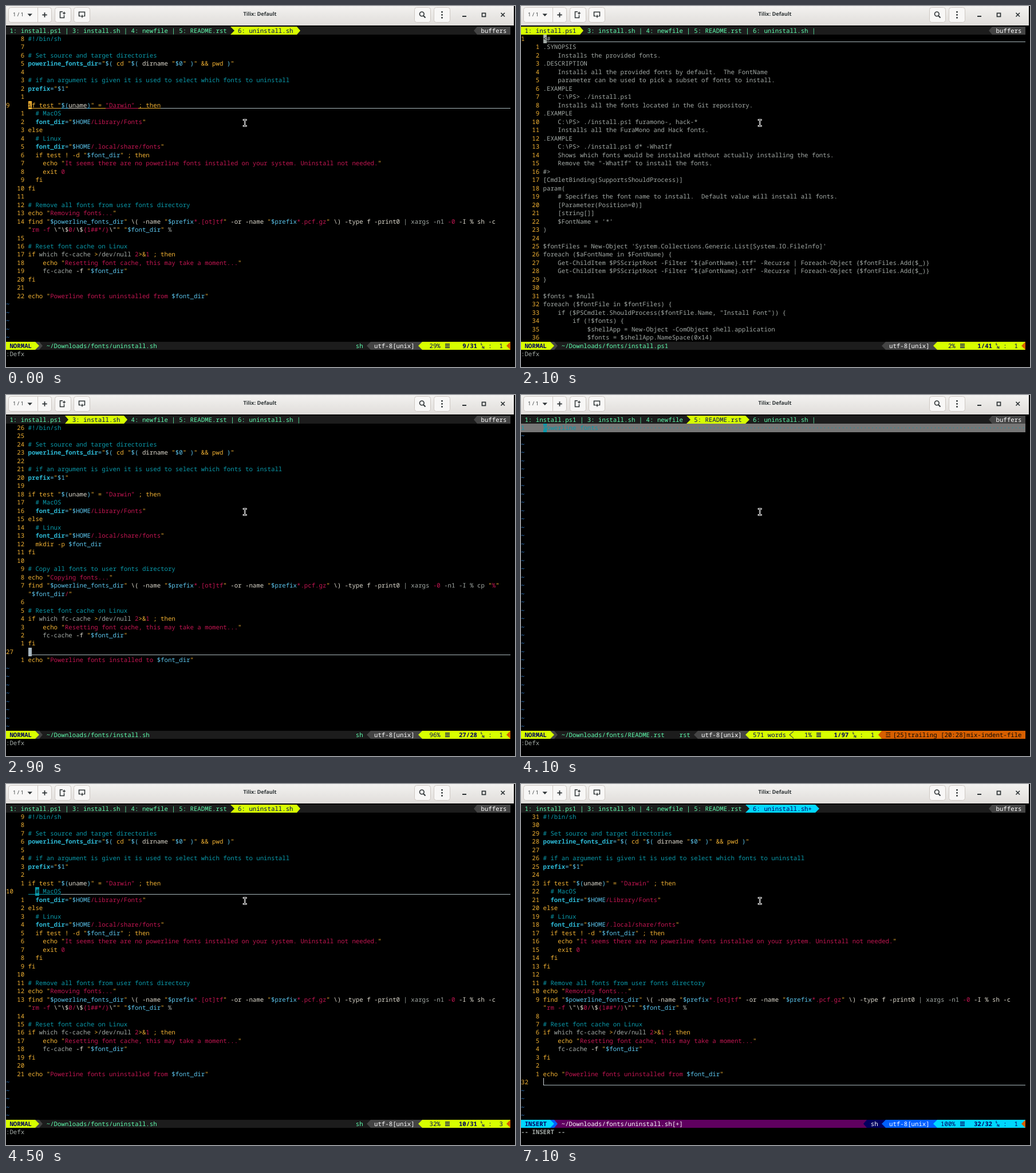
An HTML page with a canvas for the animation above (8000 ms loop, 889 px wide and 630 px high).

```html
<!DOCTYPE html>
<html lang="en">
<head>
<meta charset="utf-8">
<title>Terminal</title>
<style>
  html, body { margin: 0; width: 100%; height: 100%; overflow: hidden; background: #000; }
  canvas { display: block; }
</style>
</head>
<body>
<canvas id="stage" width="889" height="630"></canvas>
<script>
const ctx = document.getElementById('stage').getContext('2d');
const CW = 6.43, RH = 14.48, TOP = 35.6, COLS = 137, LOOP = 8000;
const MONO = '10.72px "Noto Sans Mono", "DejaVu Sans", monospace';
const SANS = '"Open Sans", sans-serif';

// Colour keys, used in text as ^key
const INK = {
  g: '#a3aaa6', c: '#0a9aab', y: '#f2b233', s: '#c41652',
  v: '#5cc6ee', b: '#2cb6d2', w: '#dcd8cc', t: '#2f7fd0'
};
const NORMAL = { name: 'NORMAL', a: '#d7ff00', b: '#444', c: '#1c1c1c', ink: '#5fffaf', ft: '#1c1c1c' };
const INSERT = { name: 'INSERT', a: '#00d7ff', b: '#005fff', c: '#5f005f', ink: '#fff', ft: '#00005f' };
const NAVY = '#00005f', ORANGE = '#d75f00';

// A leading + marks a wrapped row
const head = un => String.raw`^c#!/bin/sh

^c# Set source and target directories
^bpowerline_fonts_dir^v=^y"^v$( ^ycd "^v$( ^wdirname ^y"^v$0^y" ^v)^y" && pwd ^v)^y"

^c# if an argument is given it is used to select which fonts to ${un}install
^bprefix^v=^y"^v$1^y"

^yif test "^v$(^wuname^v)^y" = ^s"Darwin" ^y; then
^c  # MacOS
  ^bfont_dir^v=^y"^v$HOME^s/Library/Fonts^y"
^yelse
^c  # Linux
  ^bfont_dir^v=^y"^v$HOME^s/.local/share/fonts^y"
`;
const find = String.raw`^yfind "^v$powerline_fonts_dir^y" ^w\( -name ^y"^v$prefix^s*.[ot]tf^y" ^w-or -name ^y"^v$prefix^s*.pcf.gz^y" ^w\) -type f -print0 ^g| xargs `;
const tail = done => String.raw`
^c# Reset font cache on Linux
^yif ^gwhich fc-cache ^y>^g/dev/null ^s2^y>&^s1 ^y; then
^y    echo "^sResetting font cache, this may take a moment...^y"
    fc-cache ^w-f ^y"^v$font_dir^y"
^yfi

^yecho "^sPowerline fonts ${done} ^v$font_dir^y"`;

const uninstall = head('un') + String.raw`^y  if test ! -d "^v$font_dir^y" ; then
^y    echo "^sIt seems there are no powerline fonts installed on your system. Uninstall not needed.^y"
^y    exit ^s0
^y  fi
^yfi

^c# Remove all fonts from user fonts directory
^yecho "^sRemoving fonts...^y"
${find}-n1 ^s-0 ^w-I % sh -c
+^y"^srm -f ^w\"\$^s0/^w\$^s{1##*/}^w\"^y" "^v$font_dir^y" ^g%
` + tail('uninstalled from');

const install = head('') + String.raw`^y  mkdir -p ^v$font_dir
^yfi

^c# Copy all fonts to user fonts directory
^yecho "^sCopying fonts...^y"
${find}^s-0 ^g-n1 -I % cp ^y"^s%^y"
+^y"^v$font_dir^s/^y"
` + tail('installed to');

const powershell = `<#
.SYNOPSIS
    Installs the provided fonts.
.DESCRIPTION
    Installs all the provided fonts by default.  The FontName
    parameter can be used to pick a subset of fonts to install.
.EXAMPLE
    C:\\PS> ./install.ps1
    Installs all the fonts located in the Git repository.
.EXAMPLE
    C:\\PS> ./install.ps1 furamono-, hack-*
    Installs all the FuraMono and Hack fonts.
.EXAMPLE
    C:\\PS> ./install.ps1 d* -WhatIf
    Shows which fonts would be installed without actually installing the fonts.
    Remove the "-WhatIf" to install the fonts.
#>
[CmdletBinding(SupportsShouldProcess)]
param(
    # Specifies the font name to install.  Default value will install all fonts.
    [Parameter(Position=0)]
    [string[]]
    $FontName = '*'
)

$fontFiles = New-Object 'System.Collections.Generic.List[System.IO.FileInfo]'
foreach ($aFontName in $FontName) {
    Get-ChildItem $PSScriptRoot -Filter "\${aFontName}.ttf" -Recurse | Foreach-Object {$fontFiles.Add($_)}
    Get-ChildItem $PSScriptRoot -Filter "\${aFontName}.otf" -Recurse | Foreach-Object {$fontFiles.Add($_)}
}

$fonts = $null
foreach ($fontFile in $fontFiles) {
    if ($PSCmdlet.ShouldProcess($fontFile.Name, "Install Font")) {
        if (!$fonts) {
            $shellApp = New-Object -ComObject shell.application
            $fonts = $shellApp.NameSpace(0x14)`;

const readme = '^cPowerline fonts' + '·'.repeat(116);

const TABS = ['1: install.ps1', '3: install.sh', '4: newfile', '5: README.rst', '6: uninstall.sh'];
const script = { tab: 4, text: uninstall, total: 31, ft: 'sh', col: 1 };
const SCENES = [
  { ...script, at: 0, line: 9 },
  { ...script, at: 400, line: 10, col: 3 },
  { at: 2100, tab: 0, text: powershell, total: 41, line: 1, col: 1 },
  { at: 2900, tab: 1, text: install, total: 28, line: 27, col: 1, ft: 'sh' },
  { at: 3500, tab: 2, text: '', total: 1, line: 1, col: 1 },
  { at: 4100, tab: 3, text: readme, total: 97, line: 1, col: 1, ft: 'rst', fold: true,
    words: ' 571 words ', warn: ' ☲ [25]trailing [20:28]mix-indent-file ' },
  { ...script, at: 4500, line: 10, col: 3 },
  { ...script, at: 6300, line: 31 },
  { ...script, at: 7100, text: uninstall + '\n', total: 32, line: 32, insert: true }
];

const px = col => Math.round(col * CW);
const py = row => Math.round(TOP + row * RH);

function rect(x, y, w, h, color) {
  ctx.fillStyle = color;
  ctx.fillRect(x, y, w, h);
}

function box(col, row, n, color) {
  rect(px(col), py(row), px(col + n) - px(col), py(row + 1) - py(row), color);
}

function underline(col, row, n, color) {
  rect(px(col), Math.round(TOP + row * RH + 11.7), px(col + n) - px(col), 1, color);
}

function path(points, width) {
  ctx.beginPath();
  points.forEach(([x, y]) => ctx.lineTo(x, y));
  if (width) {
    ctx.lineWidth = width;
    ctx.stroke();
  } else ctx.fill();
}

// Writes one character per cell and returns the cells
function put(col, row, text, color = 'g', bold = false) {
  const cells = [];
  for (const [, key, ch] of text.matchAll(/\^(\w)|(.)/gu)) {
    if (key) { color = key; continue; }
    const ink = INK[color] || color;
    ctx.font = (bold || color === 'b' ? 'bold ' : '') + MONO;
    ctx.fillStyle = ink;
    ctx.fillText(ch, (col + cells.length) * CW, TOP + row * RH + 10.9);
    cells.push({ ch, ink });
  }
  return cells;
}

function label(col, row, text, color, back, bold) {
  box(col, row, text.length, back);
  put(col, row, text, color, bold);
}

// Powerline separator; dir 1 points right, -1 left
function arrow(col, row, dir, color, back) {
  box(col, row, 1, back);
  const a = px(dir > 0 ? col : col + 1), b = px(dir > 0 ? col + 1 : col);
  const y = py(row), end = py(row + 1);
  ctx.fillStyle = color;
  path([[a, y], [b, (y + end) / 2], [a, end]]);
}

function button(x, w) {
  ctx.beginPath();
  ctx.roundRect(x + .5, 2.5, w, 26, 4);
  ctx.fillStyle = '#f8f7f6';
  ctx.fill();
  ctx.strokeStyle = '#cdc7c2';
  ctx.lineWidth = 1;
  ctx.stroke();
}

function plus(x, y, r, width) {
  path([[x - r, y], [x + r, y]], width);
  path([[x, y - r], [x, y + r]], width);
}

function dot(x, y, r) {
  ctx.beginPath();
  ctx.arc(x, y, r, 0, 7);
}

function header() {
  const shade = ctx.createLinearGradient(0, 0, 0, 34);
  shade.addColorStop(0, '#f3f2f0');
  shade.addColorStop(1, '#e0ddda');
  rect(0, 0, 887, 34, shade);
  [[4, 75], [85, 28], [118, 28], [713, 28], [747, 28]].forEach(([x, w]) => button(x, w));
  rect(55, 3, 1, 25, '#cdc7c2');

  ctx.fillStyle = ctx.strokeStyle = '#2e3436';
  ctx.font = '9.3px ' + SANS;
  ctx.fillText('1 / 1', 12, 18);
  ctx.font = 'bold 9.2px ' + SANS;
  ctx.textAlign = 'center';
  ctx.fillText('Tilix: Default', 443.5, 17);
  ctx.textAlign = 'left';

  path([[37.5, 13.5], [46, 13.5], [41.7, 18]]);
  plus(67.5, 15.5, 4.2, 1.8);
  path([[99, 10], [94.5, 10], [94.5, 20.5], [101.5, 20.5], [101.5, 16]], 1.5);
  plus(101.5, 12.5, 2.5, 1.4);
  path([[130, 17.5], [127.5, 17.5], [127.5, 10.5], [137.5, 10.5], [137.5, 17.5], [136, 17.5]], 1.5);
  plus(133, 18, 2.5, 1.4);

  dot(726.3, 14, 3.8);
  ctx.lineWidth = 1.6;
  ctx.stroke();
  path([[729, 17], [732.5, 20.5]], 2);
  for (const y of [10.5, 15.5, 20.5]) {
    dot(761.5, y, 1.4);
    ctx.fill();
  }
  rect(797, 17, 7, 2, '#2e3436');
  ctx.lineWidth = 1.7;
  ctx.strokeRect(831.5, 12.5, 6, 6);
  path([[864.5, 12], [871, 18.5]], 1.7);
  path([[871, 12], [864.5, 18.5]], 1.7);
}

function tabs(s, m) {
  box(0, 0, COLS, NORMAL.c);
  let col = 1;
  TABS.forEach((name, i) => {
    const on = i === s.tab;
    if (on && s.insert) name += '+';
    const end = col + name.length + 1;
    if (on) {
      if (i) arrow(col - 2, 0, 1, NORMAL.c, m.a);
      label(col - 1, 0, ` ${name} `, NAVY, m.a);
      arrow(end, 0, 1, m.a, NORMAL.c);
    } else {
      put(col, 0, name, NORMAL.ink);
      if (i + 1 !== s.tab) put(end, 0, '|', NORMAL.ink);
    }
    col = end + 2;
  });
  arrow(127, 0, -1, NORMAL.b, NORMAL.c);
  label(128, 0, ' buffers ', '#fff', NORMAL.b);
}

function editor(s) {
  let row = 0, n = 0;
  for (const text of s.text.split('\n')) {
    const wrapped = text[0] === '+', here = !wrapped && ++n === s.line;
    row++;
    if (here && s.fold) box(0, row, COLS, '#767676');
    else if (here) underline(6, row, COLS - 6, '#a9b8bc');
    if (here) put(0, row, '' + n, s.fold ? 'c' : 'y');
    else if (!wrapped) put(0, row, ('' + Math.abs(n - s.line)).padStart(5), 'y');

    const cells = put(6, row, wrapped ? text.slice(1) : text);
    if (!here) continue;
    if (!s.fold) cells.forEach((cell, i) => underline(6 + i, row, 1, cell.ink));
    if (s.insert) rect(px(6), py(row), 1, 13, '#d0d8dc');
    else {
      const cell = cells[s.col - 1] || { ch: ' ', ink: '#a9b7c0' };
      label(5 + s.col, row, cell.ch, s.fold ? '#767676' : '#000', cell.ink);
    }
  }
  while (++row < 38) put(0, row, '~', 't');
}

function status(s, m) {
  const R = 38, y = py(R);
  box(0, R, COLS, m.c);
  label(0, R, ` ${m.name} `, NAVY, m.a, true);
  arrow(8, R, 1, m.a, m.b);
  arrow(9, R, 1, m.b, m.c);
  const file = TABS[s.tab].slice(3) + (s.insert ? '[+]' : '');
  put(11, R, '~/Downloads/fonts/' + file, m.ink);

  const end = s.warn ? 97 : 136;
  const percent = ` ${('' + Math.floor(s.line * 100 / s.total)).padStart(3)}% `;
  const place = `  ${('' + s.line).padStart(4)}/${s.total}`;
  const column = `   :${('' + s.col).padStart(3)} `;
  let col = end - column.length;
  label(col, R, column, NAVY, m.a);
  ctx.font = 'bold 6px ' + SANS;
  ctx.fillText('L', px(col + 1), y + 6);
  ctx.fillText('N', px(col + 1) + 2, y + 12);
  label(col -= place.length, R, place, NAVY, m.a, true);
  for (const bar of [3.5, 6.5, 9.5]) rect(px(col) + 2, y + bar, 8, 1.5, NAVY);
  label(col -= percent.length, R, percent, NAVY, m.a);
  if (s.words) {
    box(--col, R, 1, m.a);
    ctx.strokeStyle = NAVY;
    path([[px(col + 1), y + 1], [px(col), y + 7], [px(col + 1), y + 13]], 1);
    label(col -= s.words.length, R, s.words, NAVY, m.a);
  }
  arrow(--col, R, -1, m.a, m.b);
  label(col -= 13, R, ' utf-8[unix] ', '#fff', m.b);
  arrow(--col, R, -1, m.b, m.ft);
  if (s.ft) {
    const type = ` ${s.ft} `;
    label(col -= type.length, R, type, m.ink, m.ft);
    if (s.insert) arrow(col - 1, R, -1, m.ft, m.c);
  }
  arrow(end, R, -1, ORANGE, m.a);
  if (s.warn) label(end + 1, R, s.warn, '#080808', ORANGE);
  put(0, 39, s.insert ? '-- INSERT --' : ':Defx', 'g', s.insert);
}

function pointer() {
  ctx.lineCap = 'square';
  for (const [color, width] of [['#fff', 2.6], ['#000', .8]]) {
    ctx.strokeStyle = color;
    path([[417.2, 199], [417.2, 209]], width);
    path([[415, 198.7], [419.4, 198.7]], width);
    path([[415, 209.3], [419.4, 209.3]], width);
  }
  ctx.lineCap = 'butt';
}

function draw(s) {
  const mode = s.insert ? INSERT : NORMAL;
  rect(0, 0, 889, 630, '#000');
  header();
  tabs(s, mode);
  editor(s);
  status(s, mode);
  pointer();
}

let shown;
function tick() {
  const t = performance.now() % LOOP;
  const scene = SCENES.findLast(s => s.at <= t);
  if (scene !== shown) draw(shown = scene);
  requestAnimationFrame(tick);
}
ctx.textRendering = 'geometricPrecision';
tick();
</script>
</body>
</html>
```
